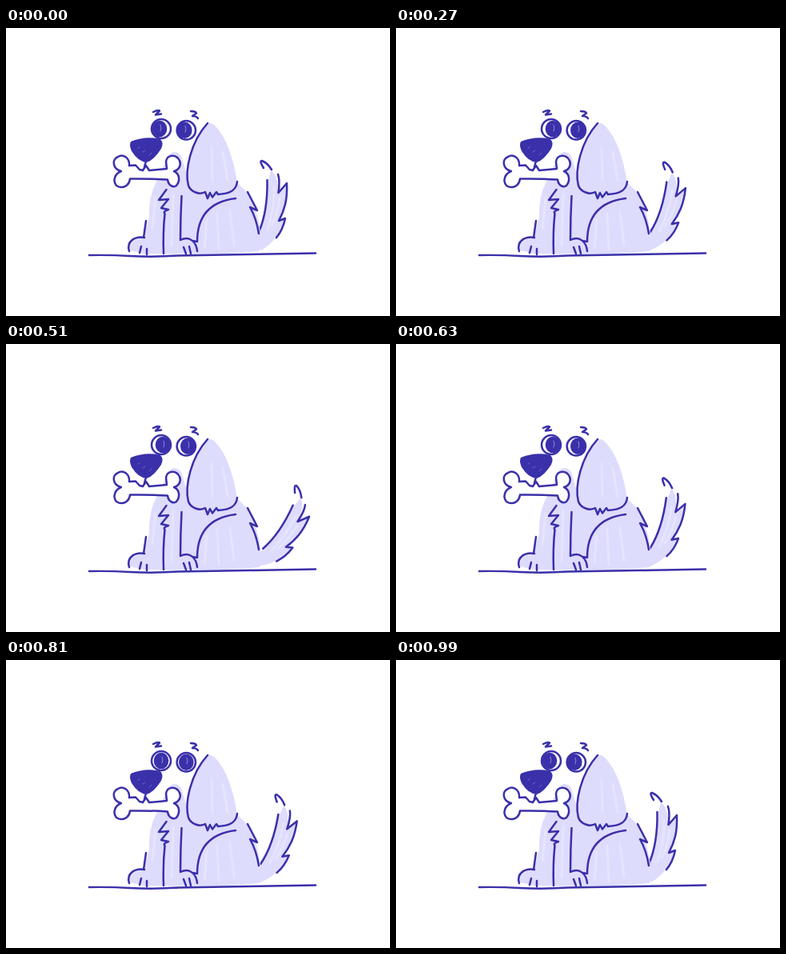
An HTML page for the animation above (1.02 s loop, 480x360 px).

```html
<!DOCTYPE html>
<html lang="en">
<head>
<meta charset="utf-8">
<title>Dog with a bone</title>
<style>
  html, body { margin: 0; width: 100%; height: 100%; overflow: hidden; background: #fff; }
  svg { display: block; width: 100vw; height: 100vh; }
  .ink { fill: none; stroke: #3a30aa; stroke-width: 2.5; stroke-linecap: round; stroke-linejoin: round; }
  .white { fill: #fff; }
  .dark { fill: #3a30aa; }
  .wash { fill: #dedcfd; }
  .streak { fill: none; stroke: #e6e4fe; stroke-width: 3; stroke-linecap: round; }
  .chalk { fill: none; stroke: #8f88d6; stroke-width: 1; stroke-linecap: round; }
</style>
</head>
<body>
<svg viewBox="0 0 480 360">
  <g id="tail">
    <path class="wash" d="M331 178 Q339 183 341 203 L350 196 Q351 220 343 241 L347 240 Q342 264 319 278 L314 262 Q327 235 327 195 Z"/>
    <path class="streak" d="M335 200 Q336 225 327 252 M342 212 Q340 230 333 246"/>
    <path class="ink" d="M322 175 C319 170 317 166 320 166 C325 168 329 172 332 177
      M340 183 C342.500 190 341.500 199 340.500 206 L351 194 C352 215 348 228 341 241 L349 238 C347 248 343 256 338 262
      M326.500 190 C327 215 323 239 316 255"/>
  </g>

  <!-- body and ear wash -->
  <path class="wash" d="M204 158 Q212 151 219 160 L228 190 L288 192 L304 208 Q316 235 318 256 Q321 270 317 279 Q270 284 172 282 L155 278 Q153 264 172 262 L179 237 Q178 210 188 192 Z"/>
  <path class="wash" d="M252 119 Q230 145 227 182 Q226 202 240 206 L262 208 Q283 208 289 193 Q281 143 262 123 Q257 118 252 119 Z"/>
  <path class="streak" d="M187 212 L183 250 M209 208 L207 272 M251 240 L248 274 M264 232 L266 276 M280 230 L285 270 M257 150 L258 190 M271 155 L277 190"/>

  <!-- body lines -->
  <path class="ink" d="M104 284 Q130 283.500 155 285 Q185 286.500 215 284.500 Q300 283 387 281.500
    M200.500 202 L191 215 L203 214 L194 225 L203 227 Q196 229 198.500 232 Q196 256 197 282
    M175 241 L172 262 M154 279 C150 266 162 260 173 262 M169 273 L167 281 M176 276 V283
    M219.500 210 Q218 238 218 265 C230 259 238 268 239 279 M222 274 L225 282 M229 273 L231 282
    M287 213 C254 217 239 236 239 267 L233 266
    M302 205 L314 228 L305 224 Q313 238 316 257
    M252 119 C231 142 223 178 228 197 C231 205 242 209 249 205 L252 213 L255 206 L258 211.500 L263 205 L265 208 C280 207 288 203 289 192"/>

  <!-- face -->
  <path class="ink" d="M184 105 Q190 102 192 103.500 L187 108.500 L194 107.500 M231 104 Q237 104 238 106.500 L233 110 Q238 110 240 113"/>
  <circle class="ink white" cx="194" cy="126" r="12"/>
  <circle class="ink white" cx="225.300" cy="127.800" r="11.700"/>
  <g id="pupils">
    <ellipse class="dark" cx="194" cy="126" rx="9.300" ry="10.300"/>
    <ellipse class="dark" cx="225.300" cy="127.800" rx="9.300" ry="10.300"/>
    <path class="chalk" d="M195 121 Q197 125 195 129 M226 122 Q228 126 226 130"/>
  </g>
  <path class="ink white" d="M154 172 C155 162 146 157 140 161 C132 164 133 176 144 179 C136 182 133 191 138 197 C146 202 154 197 155 188.500
    Q178 188 202 189.500 C203 197 209 200 213 197 C218 191 217 182 210 179 C217 177 219 171 217 166 C213 157 201 158 200 167 L201 176
    Q190 177 179 178 L175 172 L171 178 L167 177 L162 171.500 Z"/>
  <path class="ink" d="M175 166 L173 174"/>
  <path class="ink dark" d="M157 143 Q174 136 192 140 Q196 143 193 150 Q184 164 176 166.500 Q166 166 158 153 Q155 146 157 143 Z"/>
  <path class="chalk" d="M171 155 L174 153 M179 159 L182 156 M165 150 L167 149" opacity=".6"/>
</svg>
<script>
  const LOOP = 1020, STEP = 30;
  const tail = document.getElementById('tail');
  const pupils = document.getElementById('pupils');

  // [time in ms, position]: turning points, eased in between
  const wag = [[0, 0], [150, 1], [270, .35], [450, 1], [510, 1], [700, .05], [870, .55], [990, 0], [LOOP, 0]];
  const look = [[0, -1], [30, -1], [120, 1], [700, 1], [920, -1], [LOOP, -1]];

  function ease(keys, t) {
    const i = keys.findIndex(k => k[0] > t);
    const [t0, a] = keys[i - 1], [t1, b] = keys[i];
    return a + (b - a) * (1 - Math.cos(Math.PI * (t - t0) / (t1 - t0))) / 2;
  }

  function draw(now) {
    const t = Math.floor(now % LOOP / STEP) * STEP;
    tail.setAttribute('transform', `rotate(${25.5 * ease(wag, t)} 317 267)`);
    pupils.setAttribute('transform', `translate(${2 * ease(look, t)} 0)`);
    requestAnimationFrame(draw);
  }
  draw(performance.now());
</script>
</body>
</html>
```
